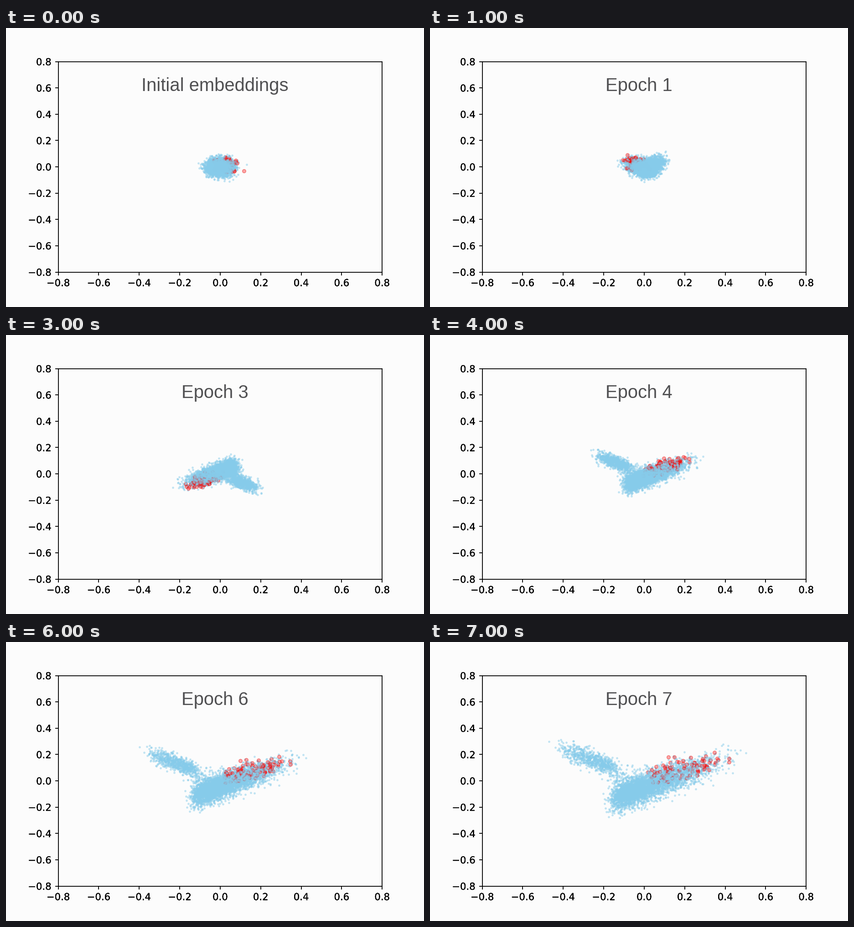
Recreate the animation shown at these times as a matplotlib script. Size 917x611 px, loop 8000 ms.

```python
import numpy as np
import matplotlib.pyplot as plt
from matplotlib import patheffects
from matplotlib.animation import FuncAnimation

W, H, DPI = 917, 611, 128
PT = 72 / DPI                      # points per pixel
LEFT, RIGHT, TOP, BOTTOM = 114.6, 825.3, 73.6, 534.5
LIM = 0.8
UNIT = np.array([RIGHT - LEFT, BOTTOM - TOP]) / (2 * LIM)
PAPER, SKY = "#fcfcfc", "#86cbea"
EPOCHS = 7

rng = np.random.default_rng(11)


def band(x, x0, y0, slope, width):
    """Points scattered around a sloping line."""
    y = y0 + slope * (x - x0) + rng.normal(0, width, len(x))
    return np.column_stack([x, y])


def make_blue():
    """Fully spread cloud, in pixels from the centre."""
    n_main, n_lobe, n_link = 4200, 750, 60
    x = -68 + 315 * rng.beta(1.5, 4.2, n_main) + rng.normal(0, 10, n_main)
    main = band(x, 0, -14, 0.34, 15.5)
    x = -65 - 130 * rng.beta(1.3, 2.0, n_lobe) + rng.normal(0, 8, n_lobe)
    lobe = band(x, -115, 46, -0.39, 10)
    link = rng.normal((-50, 10), (18, 14), (n_link, 2))
    return rng.permutation(np.vstack([main, lobe, link]))


def make_red():
    x = -12 + 205 * rng.beta(2.0, 2.3, 85)
    return band(x, 80, 24, 0.16, 11)


blue, red = make_blue(), make_red()
blue_noise = rng.normal(size=blue.shape)
red_noise = rng.normal(size=red.shape)


def spread(i):
    """Share of the final spread: nothing at first, then growing faster."""
    return 0.2 + 0.11 * (i - 1) + 0.0039 * (i - 1) ** 2 if i else 0.0


def flips(i):
    """The projection axes change sign between some epochs."""
    return (-1 if 1 <= i <= 3 else 1), (-1 if 2 <= i <= 3 else 1)


def place(base, noise, i, drift=(0, 0)):
    k = spread(i)
    px = k * base + (1 - k) * (noise * (13.5, 8.8) + drift)
    return px * flips(i) / UNIT


fig = plt.figure(figsize=(W / DPI, H / DPI), dpi=DPI, facecolor=PAPER)
ax = fig.add_axes([LEFT / W, 1 - BOTTOM / H,
                   (RIGHT - LEFT) / W, (BOTTOM - TOP) / H], facecolor=PAPER)
ax.set(xlim=(-LIM, LIM), ylim=(-LIM, LIM))
ticks = np.arange(-4, 5) / 5
ax.set_xticks(ticks)
ax.set_yticks(ticks)
ax.tick_params(length=7.4 * PT, width=1.8 * PT, pad=7.4 * PT,
               labelsize=21.2 * PT, labelfontfamily="DejaVu Sans")
for spine in ax.spines.values():
    spine.set_linewidth(1.8 * PT)
# repeated drawing gives the labels their heavy edges
for label in ax.get_xticklabels() + ax.get_yticklabels():
    label.set_path_effects([patheffects.Normal()] * 3)


def dots(size, zorder, **style):
    return ax.scatter([], [], s=(size * PT) ** 2, zorder=zorder, **style)


sky = dict(color=SKY, alpha=0.5, linewidths=0)
under = dots(4.7, 2, **sky)
marks = dots(7.6, 3, facecolors=(1, 0, 0, 0.34),
             edgecolors=(0.9, 0.1, 0.1, 0.45), linewidths=1.5 * PT)
over = dots(4.7, 4, **sky)
title = fig.text(0, 1 - 138.5 / H, "", ha="center", va="baseline",
                 family="Liberation Sans", size=40 * PT, color="#505052")
split = int(0.75 * len(blue))


def draw(i):
    points = place(blue, blue_noise, i)
    under.set_offsets(points[:split])
    over.set_offsets(points[split:])
    drift = (12 - 30 * spread(i), 4)
    marks.set_offsets(place(red, red_noise, i, drift))
    title.set_text(f"Epoch {i}" if i else "Initial embeddings")
    title.set_x(458 / W)
    return under, marks, over, title


anim = FuncAnimation(fig, draw, frames=EPOCHS + 1, interval=1000,
                     init_func=lambda: draw(0), repeat=True, repeat_delay=0)
plt.show()
```
